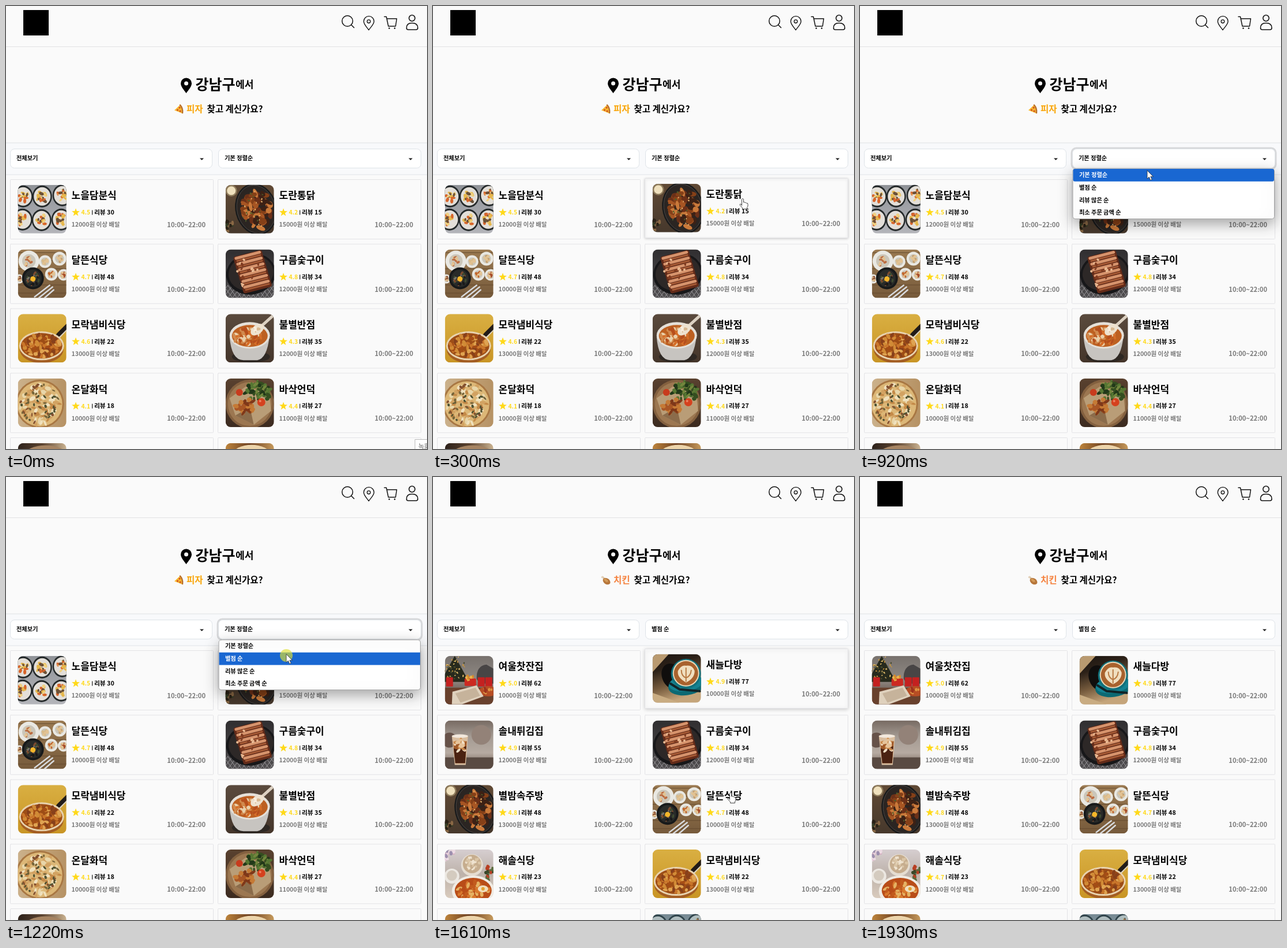
An HTML page with a canvas for the animation above (2.31 s loop, 730 by 767 pixels).

```html
<!DOCTYPE html>
<html lang="ko">
<head>
<meta charset="utf-8">
<style>
html, body { margin: 0; width: 730px; height: 767px; overflow: hidden; background: #fafafa; }
canvas { display: block; }
</style>
</head>
<body>
<canvas id="stage" width="730" height="767"></canvas>
<script>
const g = document.getElementById('stage').getContext('2d');
const LOOP = 2310;

// Drawing helpers
function paint(fill, stroke, width = 1) {
  if (fill) { g.fillStyle = fill; g.fill(); }
  if (stroke) { g.strokeStyle = stroke; g.lineWidth = width; g.stroke(); }
}
function oval(x, y, rx, ry, fill, rot = 0, stroke, width) {
  g.beginPath(); g.ellipse(x, y, rx, ry, rot, 0, 7); paint(fill, stroke, width);
}
const disc = (x, y, r, fill, stroke, width) => oval(x, y, r, r, fill, 0, stroke, width);
function box(x, y, w, h, fill, r = 0, stroke, width) {
  g.beginPath(); g.roundRect(x, y, w, h, r); paint(fill, stroke, width);
}
function shape(d, fill, stroke, width) {
  const p = new Path2D(d);
  if (fill) { g.fillStyle = fill; g.fill(p, 'evenodd'); }
  if (stroke) { g.strokeStyle = stroke; g.lineWidth = width; g.stroke(p); }
}
function text(s, x, mid, size, color = '#000', align = 'left') {
  g.font = `bold ${size}px "Noto Sans CJK KR", "Noto Sans CJK", sans-serif`;
  g.textAlign = align;
  g.fillStyle = color;
  g.fillText(s, x, mid + size * .38);
}
function shadow(color, blur, dy, draw) {
  g.save();
  g.shadowColor = color; g.shadowBlur = blur; g.shadowOffsetY = dy;
  draw();
  g.restore();
}
// Seeded scatter of small pieces inside an ellipse
function bits(n, x, y, rx, ry, size, colors, seed = 7) {
  const rnd = () => (seed = seed * 16807 % 2147483647) / 2147483647;
  rnd();
  for (let i = 0; i < n; i++) {
    const a = rnd() * 6.283, d = Math.sqrt(rnd());
    oval(x + rx * d * Math.cos(a), y + ry * d * Math.sin(a), size * (.6 + rnd() * .6),
      size * (.35 + rnd() * .4), colors[i % colors.length], rnd() * 3);
  }
}
function fade(colors, x2 = 0, y2 = 84) {
  const f = g.createLinearGradient(0, 0, x2, y2);
  colors.forEach((c, i) => f.addColorStop(i / (colors.length - 1), c));
  box(0, 0, 84, 84, f);
}
// Linear interpolation over keys [step, value, ...]
function at(keys, n) {
  const i = keys.findIndex(k => k[0] >= n);
  if (i < 0) return keys.at(-1).slice(1);
  if (!i) return keys[0].slice(1);
  const a = keys[i - 1], b = keys[i], u = (n - a[0]) / (b[0] - a[0]);
  return a.slice(1).map((v, j) => v + (b[j + 1] - v) * u);
}

// Food pictures, each in an 84 x 84 square
const photos = {
  rolls() {
    fade(['#8f9297', '#b4b5ba']);
    [[9, 20], [42, 20], [77, 18], [8, 60], [41, 61], [75, 60]].forEach(([x, y], i) => {
      oval(x, y, 17, 19, '#24292a');
      oval(x, y, 14.5, 16, '#e3dfd9');
      bits(16, x, y, 9, 10, 4, ['#e6b84c', '#d7652b', '#f0d181', '#6c5137'], i + 4);
    });
  },
  wings() {
    fade(['#614a35', '#46382c']);
    disc(10, 10, 10, '#8e7b5b'); disc(10, 10, 7.5, '#efe0bd');
    oval(53, 42, 36, 45, '#191a1b', -.25);
    oval(53, 42, 33, 42, '#2b2522', -.25, '#4b4744');
    bits(65, 53, 44, 25, 33, 7, ['#a75523', '#6b3018', '#c9793a', '#854018', '#3d2115'], 22);
    bits(30, 53, 44, 25, 33, 1.6, ['#e7b570', '#4f622b'], 9);
    bits(16, 7, 72, 10, 10, 4, ['#353d26', '#8a6845', '#292116']);
  },
  table() {
    fade(['#9b7a51', '#765a3b']);
    for (let y = 5; y < 84; y += 14) box(0, y, 84, 1, '#654a2f');
    for (const [x, y, r, c] of [[19, 20, 18, '#bb6b40'], [47, 21, 11, '#d9bb8a'], [72, 16, 12, '#c5a070'],
      [58, 43, 11, '#c2672d'], [79, 44, 10, '#a84c28'], [2, 51, 8, '#8d5132']]) {
      disc(x, y, r, '#e9e8e2'); disc(x, y, r * .65, '#cbc6b9');
      bits(14, x, y, r * .45, r * .45, 3, [c, '#e3c393'], r);
    }
    disc(26, 50, 19, '#17191a'); disc(26, 50, 15, '#292b29');
    bits(30, 26, 50, 12, 12, 3, ['#3f4b31', '#7f4b2e', '#191919', '#77736a'], 3);
    disc(26, 51, 4.5, '#f3b62a');
    shape('M29 82 55 62M36 84 60 65M46 84 62 70', null, '#d8dadd', 2.5);
  },
  pork() {
    fade(['#302e30', '#504e50']);
    for (let i = 0; i < 13; i++) shape(`M${i * 8 - 20} 84l16-22 16 22`, null, '#99979a', 1);
    oval(44, 42, 43, 36, '#171719', -.15); oval(44, 41, 39, 31, '#2d2827', -.15);
    for (let i = 0; i < 6; i++) {
      g.save(); g.translate(13 + i * 3, 13 + i * 10); g.rotate(-.25);
      box(0, 0, 51, 14, '#632b19', 4); box(2, 1, 47, 5, '#d6936c', 3); box(4, 7, 44, 3, '#a65a35', 1);
      g.restore();
    }
    bits(18, 42, 42, 28, 27, 3, ['#e9b891', '#803b20']);
  },
  pan() {
    fade(['#d9af42', '#c99525']);
    shape('M65 46 82 28', null, '#ddd2bd', 5);
    shape('M70 36 86 20', null, '#211b18', 7);
    oval(41, 61, 38, 24, '#a45e23'); oval(41, 55, 39, 25, '#e8d2ae'); oval(41, 55, 36, 22, '#9d4d16');
    bits(85, 41, 55, 33, 19, 5, ['#c9752a', '#a64d15', '#dfa351', '#87401b', '#d18b36'], 12);
  },
  ladle() {
    fade(['#5a4a3d', '#44352a']);
    oval(44, 74, 33, 10, '#2e2823');
    shape('M7 39Q10 80 31 80H55Q72 77 76 39Z', '#c7c4c0');
    oval(42, 37, 35, 23, '#e5e0d8'); oval(42, 38, 31, 19, '#bd6021');
    bits(45, 41, 39, 27, 15, 5, ['#d18a4e', '#b64f1d', '#ead0aa', '#d66e28'], 5);
    shape('M62 21 82 3', null, '#dcd1c2', 5);
    oval(55, 27, 13, 8, '#eee2cf', -.65); bits(9, 55, 27, 8, 4, 3, ['#d8b891', '#f8eddc']);
  },
  pie() {
    fade(['#cbb18b', '#b69264'], 84, 0);
    disc(38, 44, 42, '#a87743'); disc(38, 44, 39, '#dcb777');
    bits(80, 38, 44, 35, 35, 5, ['#e8d6a9', '#d2a262', '#f0e1bd', '#c48a48'], 17);
    bits(50, 38, 44, 34, 34, 3, ['#4d5132', '#77653a', '#83502f'], 33);
  },
  platter() {
    fade(['#59412f', '#3c2b20']);
    disc(42, 44, 42, '#83603f'); disc(42, 44, 38, '#9c7751');
    shape('M7 34 35 14 76 26 79 56 49 80 17 64Z', '#b99d77');
    shape('M17 64 42 49 49 80Z', '#8b6c4b');
    bits(60, 55, 25, 23, 18, 5, ['#354e20', '#557632', '#223919', '#72863d'], 4);
    bits(35, 34, 48, 17, 13, 6, ['#a95625', '#c57a35', '#7f3819'], 8);
    disc(24, 24, 6, '#c83b1d'); disc(62, 41, 7, '#d5411e'); disc(60, 39, 2, '#ed8060');
  },
  party() {
    fade(['#77716d', '#908a84', '#4c2f23']);
    shape('M17 0 42 45H-8Z', '#272a1d');
    bits(40, 17, 22, 18, 22, 1.8, ['#c9953d', '#494b2d', '#e0bb69'], 11);
    shape('M55 40Q54 17 72 15L84 22V48H60Z', '#484545');
    box(0, 55, 84, 29, '#69412d');
    for (const x of [2, 57, 70]) box(x, 37, 12, 16, '#c42120', 1);
    box(34, 39, 20, 13, '#cc2921', 2); bits(14, 44, 38, 9, 4, 3, ['#e9b34e', '#d6892c']);
    oval(75, 61, 16, 9, '#b74d24'); bits(12, 75, 60, 12, 6, 3, ['#dd9141', '#9c321d']);
    shape('M13 62 55 51 67 70 29 84H12Z', '#dfd1bd'); shape('M18 65 53 55 61 69 27 81Z', '#c6b39b');
  },
  latte() {
    fade(['#1b1511', '#2c2118', '#765b3d', '#c5a57b'], 30, 84);
    shape('M0 0H28L0 31Z', '#b99a70'); shape('M0 67 47 84H0Z', '#c9ac82');
    oval(35, 39, 18, 24, '#100e0d', -.5);
    oval(59, 54, 32, 17, '#0c6973', -.15); oval(58, 50, 30, 14, '#148292', -.15);
    disc(58, 34, 26, '#11717c'); disc(58, 33, 23, '#e9d8b9'); disc(58, 33, 21, '#a8622d');
    shape('M58 49Q42 40 44 29 50 18 58 20 69 18 73 29 73 42 58 49Z', '#f0dfbf');
    shape('M58 47V24M50 28Q50 38 58 41 66 38 67 28', null, '#b87a43', 2);
    shape('M31 51 47 61 82 64', null, '#112428', 4);
  },
  iced() {
    fade(['#776a62', '#a49b93', '#b6aaa1', '#68564b']);
    disc(63, 25, 17, '#938278'); disc(8, 34, 13, '#665249'); box(0, 64, 84, 20, '#594a42');
    shape('M12 27H40L36 77H17Z', '#d9bea0'); shape('M14 36H38L35 74H18Z', '#a15a29');
    shape('M15 48Q25 54 37 44L35 74H18Z', '#4a2212');
    bits(16, 26, 43, 10, 12, 5, ['#e6c39a', '#c88749', '#f0dec6'], 6);
    oval(26, 27, 14, 3, '#f2e8dc');
  },
  soup() {
    fade(['#d6ced0', '#bdb2aa', '#d9cbbd']);
    bits(15, 8, 8, 14, 10, 5, ['#d6b1c3', '#ecdbe3', '#9d8fae']);
    disc(47, 27, 19, '#e5ddd1'); disc(47, 25, 16, '#c6ad8e');
    bits(35, 47, 24, 13, 11, 3, ['#efe3d0', '#dac5a6']);
    disc(12, 46, 13, '#ece8e2'); disc(12, 45, 9, '#d4cbbf');
    bits(16, 78, 42, 9, 14, 4, ['#384728', '#596a3c', '#b83e22']);
    oval(49, 72, 37, 27, '#f0ebe3'); oval(49, 71, 32, 22, '#b94d18');
    bits(40, 49, 72, 27, 17, 5, ['#d9792d', '#c25b1d', '#e5b263'], 14);
    oval(66, 68, 9, 6, '#f0dfbd'); disc(66, 68, 3, '#e4a132');
  },
  dark() { fade(['#2c211a', '#5b4330', '#cbb391'], 84, 0); oval(48, 20, 36, 16, '#a68462'); },
  toast() { fade(['#bd843c', '#6d4021', '#c69a5c'], 84, 0); oval(45, 18, 31, 15, '#ecd4aa'); },
  blueRolls() { photos.rolls(); box(0, 0, 84, 84, '#45798a55'); }
};

const shop = (name, score, reviews, min, photo) => ({ name, score, reviews, min, photo });
const stew = shop('모락냄비식당', '4.6', 22, 13000, 'pan');
const rice = shop('달뜬식당', '4.7', 48, 10000, 'table');
const grill = shop('구름숯구이', '4.8', 34, 12000, 'pork');
const basic = [
  shop('노을담분식', '4.5', 30, 12000, 'rolls'), shop('도란통닭', '4.2', 15, 15000, 'wings'),
  rice, grill, stew, shop('불별반점', '4.3', 35, 12000, 'ladle'),
  shop('온달화덕', '4.1', 18, 10000, 'pie'), shop('바삭언덕', '4.4', 27, 11000, 'platter'),
  { photo: 'dark' }, { photo: 'toast' }
];
const byScore = [
  shop('여울찻잔집', '5.0', 62, 10000, 'party'), shop('새늘다방', '4.9', 77, 10000, 'latte'),
  shop('솔내튀김집', '4.9', 55, 12000, 'iced'), grill,
  shop('별밤속주방', '4.8', 48, 13000, 'wings'), rice,
  shop('해솔식당', '4.7', 23, 12000, 'soup'), stew,
  { photo: 'toast' }, { photo: 'blueRolls' }
];
const lateImages = [0, 2, 4, 6, 9];
const options = ['기본 정렬순', '별점 순', '리뷰 많은 순', '최소 주문 금액 순'];

// Hover lift per card, by step
const lifts = {
  1: [[3, 0], [4, 2], [5, 4], [6, 2], [7, 0], [18, 0], [20, 5], [21, 3], [22, 1], [23, 0]],
  5: [[21, 0], [22, 2], [23, 1], [24, 0]]
};
const path = [[1, 640, 735], [2, 600, 590], [3, 560, 430], [4, 537, 333], [5, 523, 297], [6, 510, 275],
  [7, 505, 269], [10, 505, 269], [12, 498, 285], [14, 488, 304], [15, 486, 307], [16, 486, 307],
  [17, 485, 314], [18, 485, 327], [19, 491, 372], [20, 503, 455], [21, 516, 546], [22, 521, 625], [23, 526, 700]];

const star = Array.from({ length: 10 }, (_, i) => {
  const a = i * Math.PI / 5 - Math.PI / 2, r = i % 2 ? 3 : 7.3;
  return (i ? 'L' : 'M') + (r * Math.cos(a)).toFixed(2) + ' ' + (r * Math.sin(a)).toFixed(2);
}).join('') + 'Z';

function card(s, i, n, hidden) {
  const lift = lifts[i] ? at(lifts[i], n)[0] : 0;
  g.save();
  g.translate(i % 2 ? 367 : 7, 300.5 + (i >> 1) * 111.75 - lift);
  const body = () => box(.5, 0, 352, 103, '#fafafa', 1, '#e3e3e6');
  lift ? shadow('rgba(0,0,0,.18)', lift * 2, lift / 2, body) : body();
  if (s.name) {
    text(s.name, 106.5, 27.5, 17);
    g.save(); g.translate(114, 57); shape(star, '#ffd91a'); g.restore();
    text(s.score, 123.5, 57, 10.3, '#ffd91a');
    box(142, 53, 1.2, 8, '#222');
    text('리뷰 ' + s.reviews, 146, 56.5, 10.7);
    text(s.min + '원 이상 배달', 106.5, 78, 10.5, '#797979');
    text('10:00~22:00', 339, 78, 11.2, '#797979', 'right');
  }
  if (!hidden) {
    g.translate(13.7, 9.3);
    g.beginPath(); g.roundRect(0, 0, 84, 84, 9); g.clip();
    photos[s.photo]();
  }
  g.restore();
}

function header() {
  box(30, 7, 44, 44, '#000');
  g.lineCap = g.lineJoin = 'round';
  disc(592, 26, 9.3, null, '#111', 1.5);
  shape('M598.7 32.7 603.5 37.5', null, '#111', 1.5);
  shape('M629 41.5C625 36 620.3 31.5 620.3 26.5A8.9 8.9 0 0 1 638.1 26.5C638.1 31.5 633 36 629 41.5Z', null, '#111', 1.4);
  disc(629, 26.7, 2.8, null, '#111', 1.3);
  shape('M656 18.5H659.5L663 35H675.5L677.5 22H660.5', null, '#111', 1.5);
  disc(664.5, 38.5, 1.3, '#111'); disc(674, 38.5, 1.3, '#111');
  disc(704, 21, 5.2, null, '#111', 1.6);
  shape('M694.5 38C694.5 32 698 29.5 704 29.5S714 32 714 38Q714 41 711 41H697.5Q694.5 41 694.5 38Z', null, '#111', 1.6);
  box(0, 70, 730, 1, '#e2e2e4');
}

function hero(chicken) {
  shape('M312.5 151C309 146 303 139.500 303 134A9.500 9.500 0 0 1 322 134C322 139.500 316 146 312.500 151ZM316 134A3.500 3.500 0 1 0 309 134A3.500 3.500 0 1 0 316 134Z', '#000');
  text('강남구', 328.5, 135, 25);
  text('에서', 398, 136, 17);
  if (chicken) {
    shape('M294 173 299 178', null, '#d8c3a5', 3);
    disc(293.5, 173.5, 1.8, '#e3d2ba');
    oval(301, 180.5, 7, 5, '#b7773b', .6); oval(300, 179, 4, 2, '#d39b59', .6);
  } else {
    shape('M292 180.500 302 171Q307 176 306 186Z', '#f7b92f');
    shape('M302 171.500Q307 177 306 185', null, '#b9702d', 2.5);
    for (const [x, y] of [[301, 176], [297.5, 180], [302, 182]]) disc(x, y, 1.5, '#cf4528');
  }
  text(chicken ? '치킨' : '피자', 313, 178, 15.6, chicken ? '#f5823f' : '#f9a60b');
  text('찾고 계신가요?', 348.5, 178, 15.5);
}

function select(x, w, label, open) {
  if (open) box(x - 1, 246, w + 2, 36, null, 8, '#d7d8da', 3);
  box(x + .5, 247.5, w - 1, 33, '#fff', 7, '#dee3e8');
  text(label, x + 11, 263.5, 10.2);
  shape(`M${x + w - 22} 263.500h7l-3.500 3.500z`, '#222');
}

function menu(active) {
  shadow('rgba(0,0,0,.35)', 24, 8, () => box(369, 282, 349.5, 86.5, '#fff', 4, '#a5a5a5'));
  box(369.5, 282 + active * 21.75, 348.5, 21.75, '#1967d2', active ? 0 : 3);
  options.forEach((o, i) => text(o, 380, 292.5 + i * 21.6, 10.2, i === active ? '#fff' : '#000'));
}

function cursor(x, y, arrow, pressed) {
  g.save();
  g.translate(x, y);
  if (pressed) disc(0, 2, 11, 'rgba(222,224,50,.65)');
  if (arrow) shape('M0 0V14L3.300 11 5.700 16.500 8.200 15.400 5.800 10.200H10Z', '#fff', '#333', .8);
  else shape('M-1.500 12V1.500Q0-.8 1.500 1.500V7Q3 5.700 4.200 7.600 5.700 6.500 6.700 8.500 9 7.500 9 10.500V13Q8.500 15 7.500 16V18.500H-.5V16.500L-5 11.500Q-5 9-3 10Z', '#fff', '#333', .9);
  g.restore();
}

function draw(n) {
  const open = n >= 10 && n < 17, sorted = n >= 17;
  box(0, 0, 730, 767, '#fafafa');
  header();
  hero(n >= 18);
  box(0, 237, 730, 55, '#f8f9fb');
  box(0, 236.5, 730, 1, '#dfe1e4');
  box(0, 291.5, 730, 1, '#e2e5e9');
  select(7, 351, '전체보기');
  select(368, 352, options[+sorted], open);
  (sorted ? byScore : basic).forEach((s, i) =>
    card(s, i, n, sorted && n < 19 && lateImages.includes(i)));
  const [x, y] = at(path, n);
  if (open) menu(y > 303 ? 1 : 0);
  if (n < 1) {
    box(709.5, 750.5, 40, 30, '#fff', 0, '#b9b9b9');
    text('녹화', 715, 763, 11, '#999');
  } else if (n < 24) cursor(x, y, open, n === 9 || n === 16);
}

let last;
function tick(now) {
  const n = Math.floor((now % LOOP + 13) / 76.5);
  if (n !== last) draw(last = n);
  requestAnimationFrame(tick);
}
requestAnimationFrame(tick);
</script>
</body>
</html>
```
